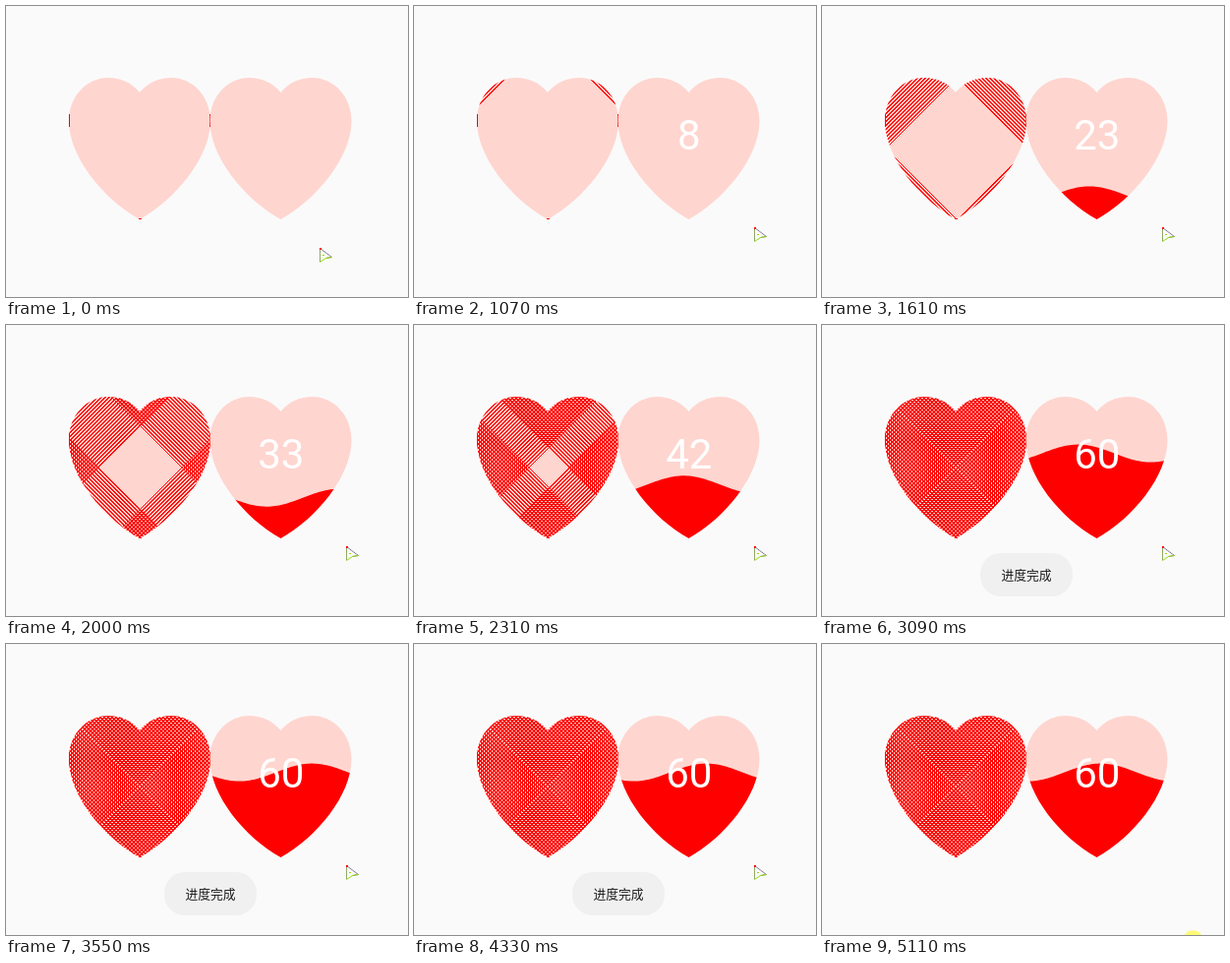
Animation of 409 by 296 pixels, one loop 5190 ms. Source, as an HTML page:

```html
<!DOCTYPE html>
<html lang="zh">
<head>
<meta charset="utf-8">
<title>Heart progress</title>
<style>
  html, body { margin: 0; width: 100%; height: 100%; overflow: hidden; background: #fafafa; }
  svg { display: block; }
  text { text-anchor: middle; }
  #num { font: 42px Roboto, sans-serif; fill: #fff; }
  #toast text { font: 12.8px "Noto Sans CJK SC", "Noto Sans CJK", sans-serif; fill: #1c1c1c; }
  #band { shape-rendering: crispEdges; }
</style>
</head>
<body>
<svg width="409" height="296" viewBox="0 0 409 296">
  <defs>
    <path id="heart" d="M136 88C128 78 116 73 104 73C82 73 64 92 64 117C64 154 100 197 136 217C172 197 208 154 208 117C208 92 190 73 168 73C156 73 144 78 136 88Z"/>
    <clipPath id="clip"><use href="#heart"/></clipPath>
    <!-- 4px diagonal hatch, two pixels on and two off -->
    <pattern id="hatch" width="4" height="4" patternUnits="userSpaceOnUse">
      <path fill="#f00" d="M0 0h2v1h-2zM0 1h1v1h-1zM3 1h1v1h-1zM2 2h2v1h-2zM1 3h2v1h-2z"/>
    </pattern>
    <path id="band" fill="url(#hatch)"/>
  </defs>

  <use href="#heart" fill="#ffd5cf"/>
  <path d="M64.5 110V123M207.5 110V123M135 216.5h3" stroke="#f00" fill="none"/>
  <g clip-path="url(#clip)">
    <g transform="translate(136 145)">
      <use href="#band"/>
      <use href="#band" transform="rotate(90)"/>
      <use href="#band" transform="rotate(180)"/>
      <use href="#band" transform="rotate(270)"/>
    </g>
  </g>

  <g transform="translate(143.5 0)">
    <use href="#heart" fill="#ffd5cf"/>
    <g clip-path="url(#clip)"><path id="wave" fill="#f00" transform="translate(-143.5 0)"/></g>
  </g>
  <text id="num" x="279.8" y="146"></text>

  <g id="toast">
    <rect x="161" y="232" width="94" height="44" rx="21" fill="#f0f0f0"/>
    <text x="208" y="259">进度完成</text>
  </g>

  <g id="cursor">
    <circle id="halo" r="10.7" fill="#fdfa78"/>
    <g fill="none">
      <path d="M.5 .5L12.5 9.5L6.5 10.5" stroke="#8a7a9a"/>
      <path d="M.5 1V14.5" stroke="#8fa868"/>
      <path d="M.5 14.5L6.5 10.5L12.5 9.5" stroke="#8ee000"/>
    </g>
    <path d="M0 0h2v2h-2z" fill="#f00"/>
    <path d="M3 7h2v1h-2z" fill="#9ad800"/>
  </g>
</svg>
<script>
const LOOP = 5190, STEPS = 67, STEP = LOOP / STEPS;
const $ = id => document.getElementById(id);
const clamp = (v, lo, hi) => Math.min(hi, Math.max(lo, v));
const ramp = (v, from, to) => clamp((v - from) / (to - from), 0, 1);

// step, x, y of the pointer as it leaves the stage
const exit = [[56, 346, 225], [58, 356, 246], [65, 372, 290], [66, 377.5, 302]];

function pointer(k) {
  if (k < 4) return [319, 246];
  if (k < 11) return null;
  if (k <= 56) return [346, 225];
  const i = exit.findIndex(p => p[0] >= k);
  const a = exit[i - 1], b = exit[i], f = ramp(k, a[0], b[0]);
  return [a[1] + (b[1] - a[1]) * f, a[2] + (b[2] - a[2]) * f];
}

function wavePath(t) {
  const level = 217 - 1.44 * Math.min(60, 0.03 * (t - 1050));
  const crest = 283 - 0.209 * (t - 5107);
  let d = 'M200 400';
  for (let x = 200; x <= 360; x += 2) {
    const y = level - 9 * Math.cos(2 * Math.PI * (x - crest) / 148);
    d += `L${x} ${y.toFixed(2)}`;
  }
  return d + 'L360 400Z';
}

function draw(k) {
  const gap = Math.max(0, Math.round(112 - 5.83 * (k - 14)));
  const edge = 300 - gap;
  $('band').setAttribute('d', `M-300 -300L${edge} -300L-300 ${edge}Z`);
  $('wave').setAttribute('d', wavePath(k * STEP - 8));

  $('num').textContent = clamp(Math.floor(8 + 2.15 * (k - 14)), 0, 60);
  $('num').style.opacity = ramp(k, 0, 8);
  $('toast').style.opacity = ramp(k, 33, 38) * (1 - ramp(k, 58, 64));

  const pos = pointer(k);
  $('cursor').style.display = pos ? '' : 'none';
  if (pos) $('cursor').setAttribute('transform', `translate(${pos})`);
  $('halo').style.display = k >= 58 ? '' : 'none';
}

let start, last = -1;
function tick(now) {
  start ??= now;
  const k = Math.min(STEPS - 1, Math.floor(((now - start) % LOOP + 22) / STEP));
  if (k !== last) draw(last = k);
  requestAnimationFrame(tick);
}
draw(0);
requestAnimationFrame(tick);
</script>
</body>
</html>
```
